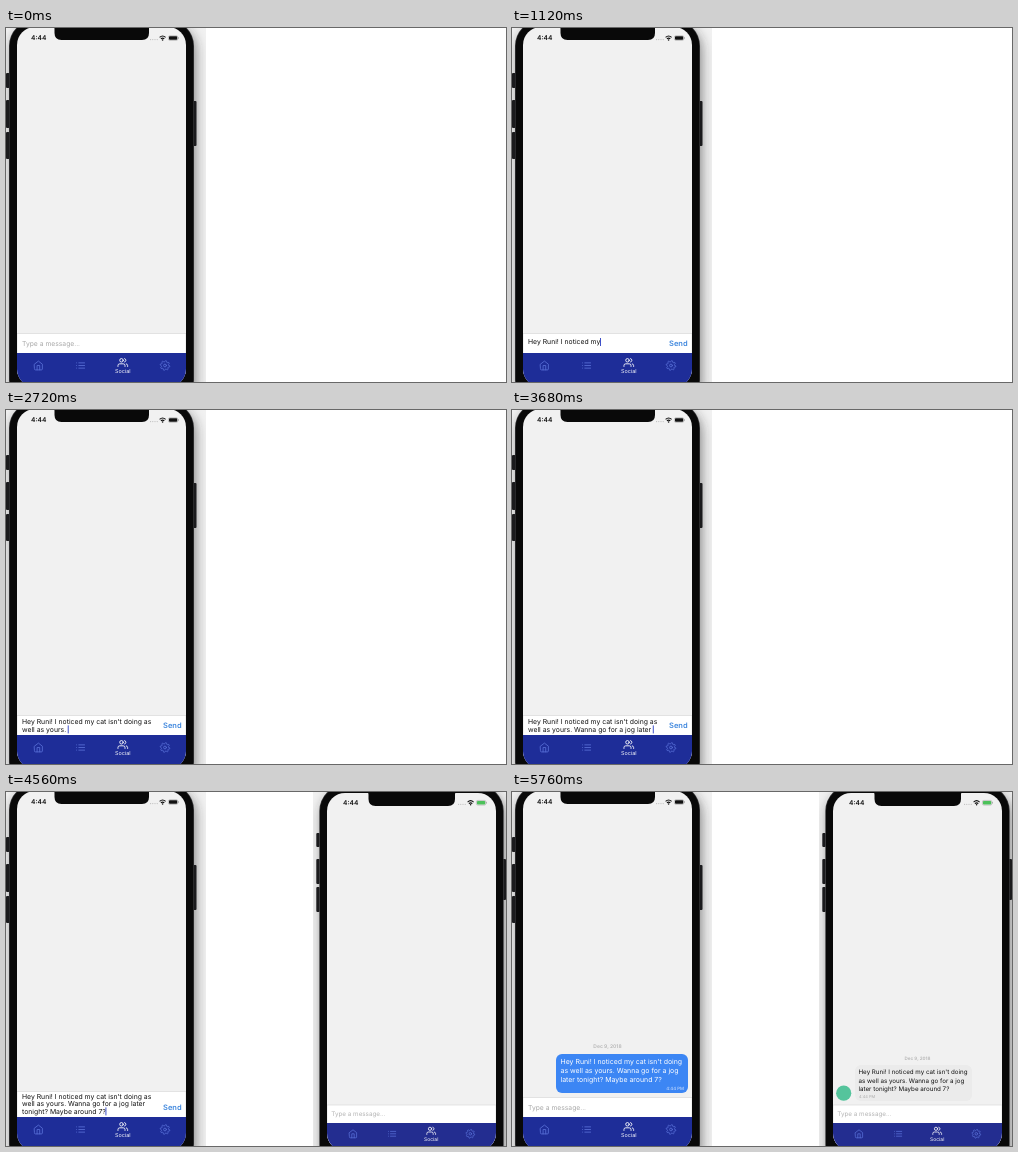
An HTML page that plays this animation: 500x354 px, repeating every 7.76 s.

```html
<!DOCTYPE html>
<html lang="en">
<head>
<meta charset="utf-8">
<title>Chat between two phones</title>
<style>
  html, body { margin: 0; width: 100%; height: 100%; overflow: hidden; background: #fff; }
  svg { display: block; width: 100vw; height: 100vh; }
  text { font-family: Inter, "Liberation Sans", sans-serif; white-space: pre; text-rendering: geometricPrecision; }
  .icon { fill: none; stroke-width: 2; stroke-linecap: round; stroke-linejoin: round; }
</style>
</head>
<body>
<svg id="stage" viewBox="0 0 500 354"></svg>
<script>
const LOOP = 7760, STEP = 80, LAST = 5760;
const PEER_SHOWN = 3760, POINTER_SHOWN = 4640, SENT = 4960, RECEIVED = 5360, BLURRED = 5520;

const DRAFT = ["Hey Runi! I noticed my cat isn't doing as ", "well as yours. Wanna go for a jog later ", "tonight? Maybe around 7?"];
const MESSAGE = ["Hey Runi! I noticed my cat isn't doing", "as well as yours. Wanna go for a jog", "later tonight? Maybe around 7?"];
// [time, characters typed]
const TYPING = [[80, 0], [1120, 22], [2720, 57], [3680, 82], [3840, 88], [4560, 106]];

const rect = (x, y, w, h, fill, rx = 0, extra = "") =>
  `<rect x="${x}" y="${y}" width="${w}" height="${h}" rx="${rx}" fill="${fill}" ${extra}/>`;
const text = (x, y, size, fill, str, extra = "") =>
  `<text x="${x}" y="${y}" font-size="${size}" fill="${fill}" ${extra}>${str}</text>`;
const group = (id, content) => `<g id="${id}">${content}</g>`;

const gear = "M" + Array.from({ length: 64 }, (_, i) => {
  const a = i / 64 * 2 * Math.PI, r = 9.6 + 1.4 * Math.tanh(3 * Math.sin(8 * a));
  return (12 + r * Math.cos(a)).toFixed(1) + " " + (12 + r * Math.sin(a)).toFixed(1);
}).join("L") + "Z";

const ICONS = [
  '<path d="M3 9l9-7 9 7v11a2 2 0 0 1-2 2H5a2 2 0 0 1-2-2zM9 22V12h6v10"/>',
  '<path d="M8 6h13M8 12h13M8 18h13M3 6h.01M3 12h.01M3 18h.01"/>',
  '<path d="M17 21v-2a4 4 0 0 0-4-4H5a4 4 0 0 0-4 4v2M23 21v-2a4 4 0 0 0-3-3.87M16 3.13a4 4 0 0 1 0 7.75"/><circle cx="9" cy="7" r="4"/>',
  `<path d="${gear}"/><circle cx="12" cy="12" r="3.2"/>`
];

function statusBar(p) {
  const { x, y } = p.status;
  const dots = [0, 1, 2, 3].map(i => rect(x - 12.6 + i * 2.2, y + 1, 1.2, 1.2, "#bbb", .6)).join("");
  const wifi = `<g fill="none" stroke="#111" stroke-width="1.1">
    <path d="M${x - 3} ${y - .6}q3 -2.8 6 0M${x - 1.7} ${y + .9}q1.7 -1.6 3.4 0"/></g>
    <circle cx="${x}" cy="${y + 2}" r=".8" fill="#111"/>`;
  const battery = rect(x + 5.8, y - 2.3, 9.4, 4.7, "none", 1.4, 'stroke="#999" stroke-width=".5"') +
    rect(x + 6.4, y - 1.7, 8.2, 3.5, p.battery, .8) + rect(x + 15.6, y - .8, .7, 1.6, "#999");
  return text(p.clock, y + 2.4, 6.6, "#111", "4:44", 'font-weight="600"') + dots + wifi + battery;
}

function tabBar(p) {
  const bar = p.bar;
  const icons = ICONS.map((shape, i) => {
    const active = i === 2, cx = bar.tab + i * bar.gap, cy = bar.iconY - (active ? 3 : 0);
    return `<g class="icon" stroke="${active ? "#fff" : "#566dd4"}"
      transform="translate(${cx} ${cy}) scale(${bar.scale}) translate(-12 -12)">${shape}</g>`;
  }).join("");
  return rect(p.screen.x, bar.y, 169, 40, bar.fill) + icons +
    text(bar.tab + 2 * bar.gap, bar.iconY + 7.3, bar.label, "#fff", "Social", 'text-anchor="middle"');
}

function phone(p) {
  const { body, screen, notch } = p;
  const shell = fill => rect(body.x, body.y, body.w, 385, fill, 26);
  const buttons = p.buttons.map(([x, y, h]) => rect(x, y, 3.5, h, "#1b1b1d", 1)).join("");
  const n = notch, w = n.right - n.left;
  const notchShape = `<path fill="#090909" d="M${n.left - 2} ${screen.y - 1}q2 0 2 3v4q0 7 7 7h${w - 14}q7 0 7 -7v-4q0 -3 2 -3z"/>`;
  return `<clipPath id="${p.id}Crop">${rect(p.crop[0], 0, p.crop[1], 354, "#000")}</clipPath>
    <clipPath id="${p.id}Screen">${rect(screen.x, screen.y, 169, screen.h, "#000", 18)}</clipPath>
    <g clip-path="url(#${p.id}Crop)">
      ${rect(p.crop[0], 0, p.crop[1], 354, "#f1f1f1")}
      <g filter="url(#blur)" opacity=".5" transform="translate(2 5)">${shell("#222")}</g>
      ${buttons}${shell("#39393b")}
      ${rect(body.x + .7, body.y + .7, body.w - 1.4, 383.6, "#090909", 25.3)}
      <g clip-path="url(#${p.id}Screen)">
        ${rect(screen.x, screen.y, 169, screen.h, "#f1f1f1")}
        ${statusBar(p)}${p.content}${tabBar(p)}${notchShape}
      </g>
    </g>`;
}

function inputBox(id, x, y, placeholder) {
  return rect(x, y, 169, 40, "#fff", 0, `id="${id}" stroke="#d4d4d4" stroke-width=".6"`) + placeholder;
}

const lines = (x, y, gap, size, fill) =>
  MESSAGE.map((line, i) => text(x, y + i * gap, size, fill, line)).join("");
const date = (x, y, size) =>
  text(x, y, size, "#b4b4b4", "Dec 9, 2018", 'text-anchor="middle" font-weight="600"');

const sender = {
  id: "sender", crop: [0, 200], body: { x: 3, y: -8, w: 185 }, screen: { x: 11, y: -1, h: 360 },
  notch: { left: 48.5, right: 143 }, clock: 25, status: { x: 156.6, y: 10 }, battery: "#111",
  buttons: [[0, 45, 15], [0, 72, 28], [0, 104, 27], [187, 73, 45]],
  bar: { y: 325, tab: 32.4, gap: 42.2, iconY: 337.5, scale: .44, label: 5.4, fill: "#1e2d98" },
  content:
    group("sentMessage", date(95.5, 256, 5) + rect(44, 262, 132, 39, "#3c86f4", 6) +
      lines(48.5, 271.5, 9, 6.95, "#fff") +
      text(172, 298, 4.4, "#dbe8ff", "4:44 PM", 'text-anchor="end"')) +
    inputBox("field", 11, 305.5, text(16, 317.6, 6.75, "#a8a8a8", "Type a message...", 'id="hint"')) +
    DRAFT.map((_, i) => text(16, 0, 6.85, "#111", "", `id="draft${i}"`)).join("") +
    rect(0, 0, .9, 8, "#2b3fc4", 0, 'id="caret"') +
    text(157, 318.2, 7.5, "#3d86dd", "Send", 'id="send" font-weight="600"')
};

const receiver = {
  id: "receiver", crop: [307, 193], body: { x: 313.3, y: -7, w: 184.4 }, screen: { x: 321, y: 1, h: 358 },
  notch: { left: 362.5, right: 449 }, clock: 337, status: { x: 464.6, y: 10.7 }, battery: "#4cc15a",
  buttons: [[310.3, 41, 14], [310.3, 67, 25], [310.3, 95, 25], [496.5, 67, 41]],
  bar: { y: 331, tab: 347, gap: 39.1, iconY: 341.8, scale: .4, label: 5, fill: "#232d90" },
  content:
    group("receivedMessage", date(405.5, 268.4, 4.6) + rect(343, 273, 117, 36, "#ebebeb", 6) +
      lines(346.5, 282.3, 8.2, 6.23, "#111") + text(347, 305.5, 4, "#aaa", "4:44 PM") +
      '<circle cx="331.7" cy="301.2" r="7.6" fill="#55c49c"/>') +
    inputBox("peerField", 321, 313, text(325.3, 324, 6.3, "#b4b4b4", "Type a message..."))
};

document.getElementById("stage").innerHTML =
  `<filter id="blur" x="-20%" y="-20%" width="140%" height="140%"><feGaussianBlur stdDeviation="6"/></filter>
  ${phone(sender)}${group("peer", phone(receiver))}
  <path id="pointer" d="M169.4 314.6v7.2l1.7 -1.5 1.3 2.9 1.3 -.6 -1.3 -2.8h2.3z" fill="#000" stroke="#fff" stroke-width=".4"/>`;

const $ = id => document.getElementById(id);
const show = (id, visible) => $(id).setAttribute("visibility", visible ? "visible" : "hidden");

function typedCount(t) {
  if (t <= TYPING[0][0]) return 0;
  for (let i = 1; i < TYPING.length; i++) {
    const [t0, n0] = TYPING[i - 1], [t1, n1] = TYPING[i];
    if (t <= t1) return Math.floor(n0 + (n1 - n0) * (t - t0) / (t1 - t0) + 1e-6);
  }
  return TYPING.at(-1)[1];
}

function drawDraft(count, focused) {
  let left = count;
  const parts = DRAFT.map(line => {
    const part = line.slice(0, Math.max(0, left));
    left -= line.length;
    return part;
  });
  const rows = parts.filter(Boolean).length;
  const lastBaseline = rows > 1 ? 321.6 : 316.2;
  parts.forEach((part, i) => {
    $("draft" + i).textContent = part;
    $("draft" + i).setAttribute("y", lastBaseline - (rows - 1 - i) * 7.3);
  });
  $("field").setAttribute("y", rows > 2 ? 299.3 : 305.5);
  show("hint", !count);
  show("send", count);
  show("caret", focused);
  const width = rows ? $("draft" + (rows - 1)).getComputedTextLength() : 0;
  $("caret").setAttribute("x", 15.7 + width);
  $("caret").setAttribute("y", (rows ? lastBaseline : 316.2) - 6.2);
}

function render(now) {
  const t = Math.min(LAST, Math.floor((now % LOOP) / STEP) * STEP);
  drawDraft(t < SENT ? typedCount(t) : 0, t >= STEP && t < BLURRED);
  show("sentMessage", t >= SENT);
  show("receivedMessage", t >= RECEIVED);
  $("peer").style.display = t >= PEER_SHOWN ? "" : "none";
  show("pointer", t >= POINTER_SHOWN && t < BLURRED);
}

const start = performance.now();
function tick() {
  render(performance.now() - start);
  requestAnimationFrame(tick);
}
tick();
</script>
</body>
</html>
```
